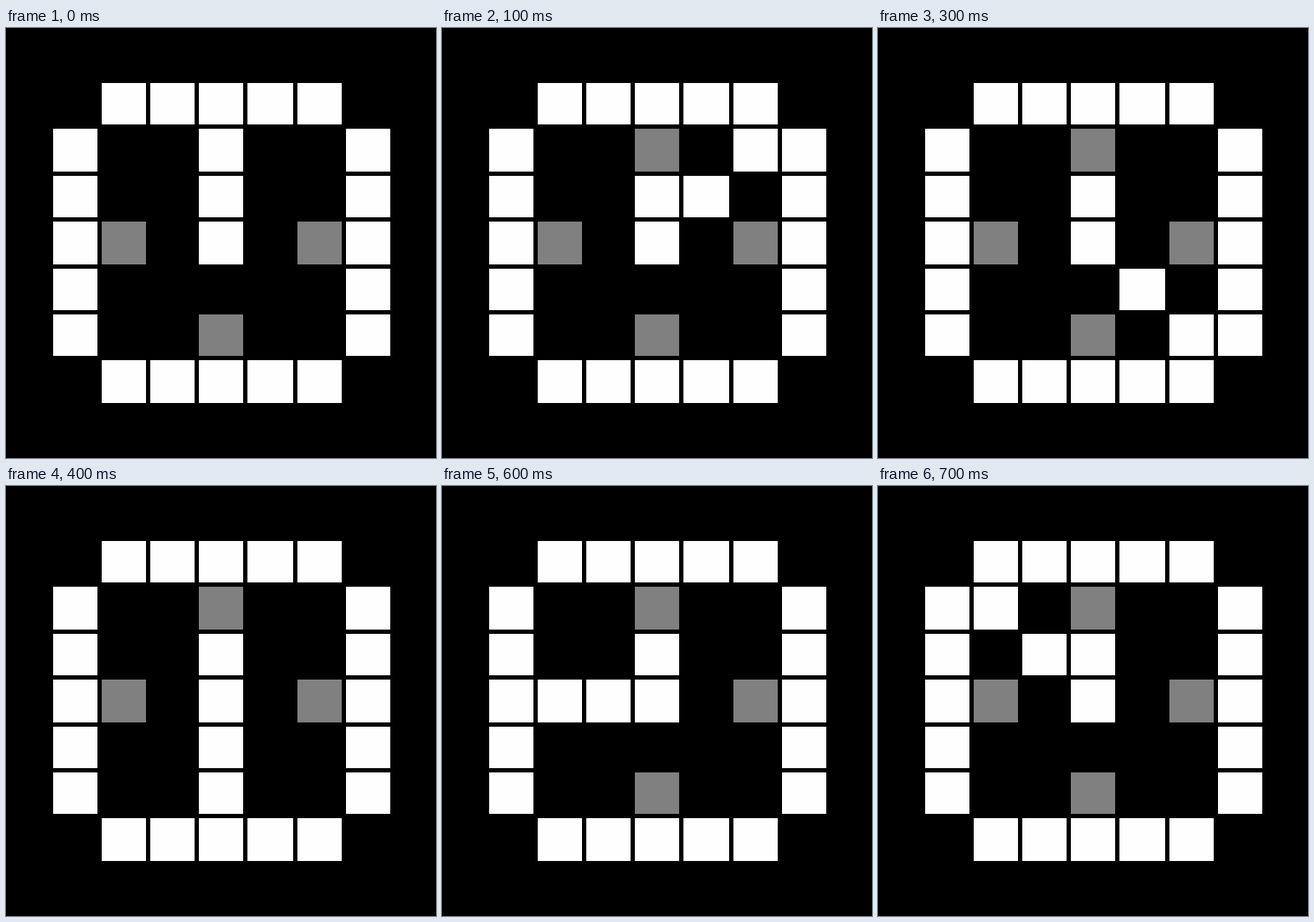
These frames come from a looping animation (602x602 px, 800 ms). An HTML page:

```html
<!DOCTYPE html>
<html lang="en">
<head>
<meta charset="utf-8">
<title>Block clock</title>
<style>
  html, body { margin: 0; width: 100%; height: 100%; overflow: hidden; background: #000; }
  svg { display: block; width: 100%; height: 100%; }
</style>
</head>
<body>
<svg id="clock" viewBox="0 0 602 602" shape-rendering="crispEdges"></svg>
<script>
const LOOP = 800, STEPS = 8, MID = 3, LAST = 6;
const WHITE = '#fefefe', GRAY = '#808080', BLACK = '#000';

// [start, end] of each column and row
const cols = [[66, 128], [134, 196], [202, 264], [270, 332], [338, 402], [408, 470], [476, 538]];
const rows = [[77, 135], [141, 201], [207, 265], [271, 331], [337, 395], [401, 459], [465, 525]];

const svg = document.getElementById('clock');
const cells = [];

rows.forEach(([top, bottom], r) => cols.forEach(([left, right], c) => {
  const rect = document.createElementNS(svg.namespaceURI, 'rect');
  rect.setAttribute('x', left);
  rect.setAttribute('y', top);
  rect.setAttribute('width', right - left);
  rect.setAttribute('height', bottom - top);
  svg.append(rect);
  cells.push({ rect, r, c });
}));

const onEdge = n => n === 0 || n === LAST;

// The minute hand covers two cells outward from the centre.
function onMinuteHand(dx, dy, step) {
  const angle = step * 2 * Math.PI / STEPS;
  const hx = Math.round(Math.sin(angle)), hy = -Math.round(Math.cos(angle));
  return [1, 2].some(k => dx === k * hx && dy === k * hy);
}

function cellColor(r, c, step) {
  const dx = c - MID, dy = r - MID;
  const rim = onEdge(r) !== onEdge(c);
  const hourHand = dx === 0 && (dy === 0 || dy === -1);
  if (rim || hourHand || onMinuteHand(dx, dy, step)) return WHITE;
  const mark = dx * dy === 0 && Math.abs(dx + dy) === 2;
  return mark ? GRAY : BLACK;
}

function draw(time) {
  const step = Math.floor((time % LOOP) / (LOOP / STEPS));
  for (const { rect, r, c } of cells) rect.setAttribute('fill', cellColor(r, c, step));
}

let start;
function tick(now) {
  start ??= now;
  draw(now - start);
  requestAnimationFrame(tick);
}
draw(0);
requestAnimationFrame(tick);
</script>
</body>
</html>
```
